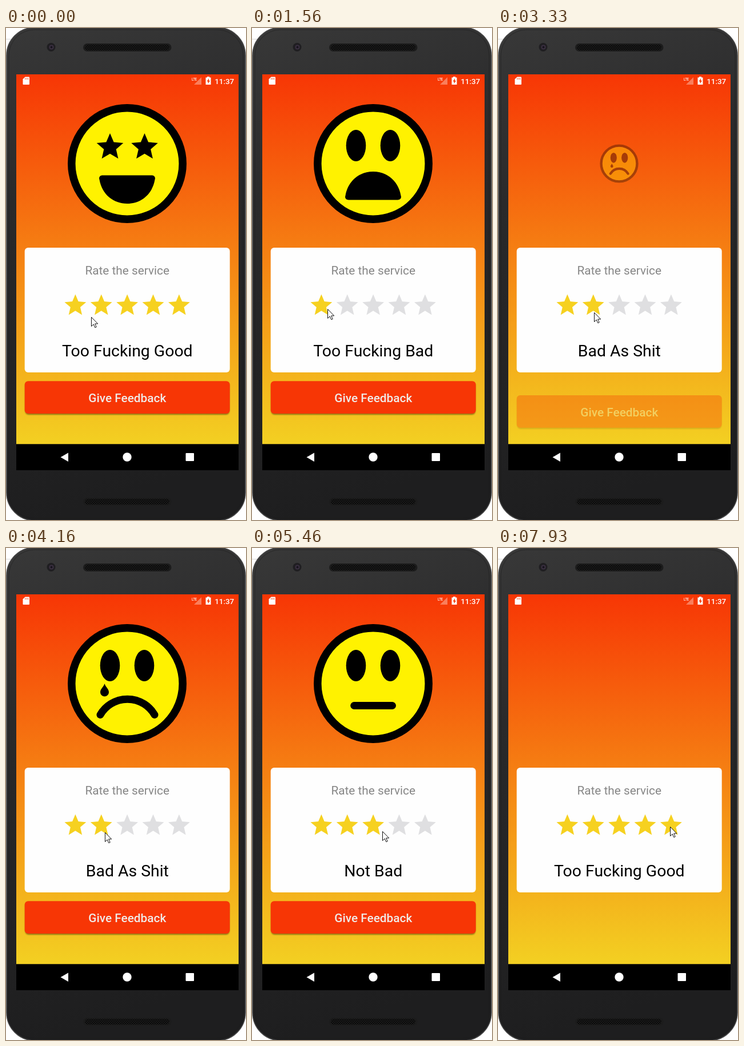
An HTML page that plays this animation: 420x860 px, repeating every 8000 ms.

```html
<!DOCTYPE html>
<html lang="en">
<head>
<meta charset="utf-8">
<title>Rate the service</title>
<style>
html, body { margin: 0; width: 100%; height: 100%; overflow: hidden; background: #fff; }
svg { display: block; }
text { font-family: Roboto, sans-serif; text-anchor: middle; }
.line { fill: none; stroke: #000; stroke-width: 13; stroke-linecap: round; }
</style>
</head>
<body>
<svg width="420" height="860" viewBox="0 0 420 860">
  <defs>
    <linearGradient id="shell" x2=".15" y2="1">
      <stop stop-color="#383838"/><stop offset=".35" stop-color="#2a2a2b"/><stop offset="1" stop-color="#1e1e1f"/>
    </linearGradient>
    <linearGradient id="sky" x2="0" y2="1">
      <stop stop-color="#f73605"/><stop offset="1" stop-color="#f3d022"/>
    </linearGradient>
    <pattern id="mesh" width="4" height="4" patternUnits="userSpaceOnUse">
      <circle cx="1" cy="1" r=".9"/><circle cx="3" cy="3" r=".9"/>
    </pattern>
    <filter id="blur" x="-5%" y="-20%" width="110%" height="150%"><feGaussianBlur stdDeviation="1.3"/></filter>
    <path id="star" d="M12 17.27L18.18 21l-1.64-7.03L22 9.24l-7.19-.61L12 2 9.19 8.63 2 9.24l5.46 4.73L5.82 21z"/>
    <path id="starEye"/>
    <path id="mouth" d="M169 300.5C164.500 300.500 162 297 163.500 293C168 267 188 251 212 251S256 267 260.500 293C262 297 259.500 300.500 255 300.500Z"/>
    <g id="grille">
      <rect x="135" y="27" width="154.500" height="14" rx="7" fill="#1c1c1c"/>
      <rect x="138" y="29" width="148" height="10" rx="5" fill="url(#mesh)"/>
    </g>
  </defs>

  <!-- phone -->
  <path d="M0 19.500H12" stroke="#ddd"/>
  <rect x="1" y="-1" width="418" height="862" rx="49" fill="url(#shell)" stroke="#454545" stroke-width="1.500"/>
  <rect x="5" y="3" width="410" height="854" rx="45" fill="none" stroke="#1b1b1b" stroke-opacity=".5"/>
  <use href="#grille"/>
  <use href="#grille" y="794"/>
  <circle cx="79" cy="33.500" r="7.500" fill="#1f1e21"/>
  <circle cx="79.500" cy="33.500" r="4" fill="#3a2f40"/>
  <circle cx="79.500" cy="33.500" r="2" fill="#17141c"/>

  <!-- screen -->
  <rect x="18" y="81" width="389" height="646.500" fill="url(#sky)"/>
  <rect x="18" y="727.500" width="389" height="45.500"/>
  <g fill="#fff">
    <path d="M109 742.500V758L95.500 750.200Z"/>
    <circle cx="212" cy="750" r="7.700"/>
    <rect x="314.500" y="743" width="14.500" height="14" rx="1"/>
    <path d="M33.500 85.500H40q1 0 1 1V98q0 1-1 1H30.500q-1 0-1-1V89.500Z"/>
    <path d="M33.700 87.500v2.500M36.200 87.500v2.500M38.700 87.500v2.500" stroke="#f73c06"/>
    <path d="M342 86V99H329Z" opacity=".35"/>
    <text x="329.500" y="91.500" font-size="7.500" font-weight="500" textLength="9" lengthAdjust="spacingAndGlyphs">LTE</text>
    <path d="M352 85h4v1.500h2.500V99h-9V86.500H352Z"/>
    <path d="M355 88l-3.500 5.500h2V97.500L357 92h-2Z" fill="#f73c06"/>
    <text x="382.200" y="97.500" font-size="13.400" font-weight="500">11:37</text>
  </g>

  <!-- face -->
  <g id="face">
    <circle cx="212" cy="237" r="97.200" fill="#fff200" stroke="#000" stroke-width="13.500"/>
    <g id="eyes"><ellipse cx="182" cy="205.500" rx="17.300" ry="27.500"/><ellipse cx="242" cy="205.500" rx="17.300" ry="27.500"/></g>
    <g class="mood"><use href="#mouth"/></g>
    <g class="mood">
      <path class="line" d="M165 291.500A55 55 0 0 1 260 291.500"/>
      <path d="M172.500 237C174 243 180 246 180 252A7.500 7.500 0 0 1 165 252C165 246 171 243 172.500 237Z"/>
    </g>
    <g class="mood"><path class="line" d="M178.700 275.500H245.500"/></g>
    <g class="mood"><path class="line" d="M165.500 266A54 54 0 0 0 258.500 266"/></g>
    <g class="mood">
      <use href="#starEye" x="182" y="208.500"/><use href="#starEye" x="242.500" y="208.500"/>
      <use href="#mouth" transform="matrix(1 0 0 -1 0 558)"/>
    </g>
  </g>

  <!-- card -->
  <rect x="32.700" y="384" width="359" height="218" rx="6" fill="#fefefe"/>
  <text x="212.200" y="431" font-size="20.800" fill="#868686">Rate the service</text>
  <g id="stars"></g>
  <text id="label" x="212.300" y="574" font-size="28.400"></text>

  <g id="button">
    <rect x="33.500" y="619" width="357.500" height="57" rx="6" opacity=".4" filter="url(#blur)"/>
    <rect x="32.700" y="617.300" width="359" height="56.700" rx="6" fill="#f73605"/>
    <text x="212.300" y="654" font-size="20.800" font-weight="500" fill="#f0ebe8">Give Feedback</text>
  </g>

  <path id="cursor" d="M.5.500V16.500L4.200 13 6.800 18.700 9.200 17.700 6.700 12H11.700Z" fill="#fff" stroke="#111"/>
</svg>
<script>
const $ = id => document.getElementById(id);
const labels = ["Too Fucking Bad", "Bad As Shit", "Not Bad", "Good", "Too Fucking Good"];
const LOOP = 8000, REVEAL = 600;

// each tap: finger down fills the stars, release swaps the face, then it grows back in
const taps = [
  { down: -1200, up: -1100, show: -1000, rating: 5 },
  { down: 730, up: 860, show: 960, rating: 1 },
  { down: 2860, up: 3000, show: 3100, rating: 2 },
  { down: 4660, up: 4730, show: 4860, rating: 3 },
  { down: 6060, up: 6200, show: 6282, rating: 4 },
  { down: 7830, up: 7930, show: 8030, rating: 5 }
];
// time, x, y of the pointer tip
const path = [
  [0, 149, 505], [500, 132, 491], [2100, 132, 491], [2600, 168, 497],
  [4120, 168, 497], [4460, 209, 496], [5200, 209, 496], [5460, 228, 495],
  [5570, 228, 495], [5860, 255, 489], [7070, 255, 489], [7250, 270, 496], [7530, 301, 487]
];

$("starEye").setAttribute("d", "M" + Array.from({ length: 10 }, (_, i) => {
  const r = i % 2 ? 11.2 : 24.5, a = i * Math.PI / 5;
  return [r * Math.sin(a), -r * Math.cos(a)].map(v => v.toFixed(2));
}).join("L") + "Z");

$("stars").innerHTML = labels.map((_, i) =>
  `<use href="#star" transform="translate(${98.7 + 45.38 * i} 461.7) scale(1.89)"/>`).join("");
const stars = [...$("stars").children];
const moods = [...document.querySelectorAll(".mood")];

function pointer(t) {
  const i = path.findIndex(p => p[0] > t);
  if (i < 0) return path.at(-1).slice(1);
  const [t0, x0, y0] = path[i - 1], [t1, x1, y1] = path[i];
  const k = (t - t0) / (t1 - t0);
  return [x0 + (x1 - x0) * k, y0 + (y1 - y0) * k];
}

function draw(t) {
  const { rating } = taps.findLast(p => p.down <= t);
  const shown = taps.findLast(p => p.up <= t);
  const k = Math.min(1, Math.max(0, (t - shown.show) / REVEAL));
  const s = (1 - Math.cos(k * Math.PI)) / 2;

  stars.forEach((star, i) => star.setAttribute("fill", i < rating ? "#f6d120" : "#dfdfe1"));
  moods.forEach((mood, i) => mood.style.display = i + 1 === shown.rating ? "" : "none");
  $("eyes").style.display = shown.rating < 5 ? "" : "none";
  $("label").textContent = labels[shown.rating - 1];

  $("face").setAttribute("transform", `translate(212 237) scale(${s}) translate(-212 -237)`);
  $("button").setAttribute("transform", `translate(0 ${36.5 * (1 - s)})`);
  $("face").style.opacity = $("button").style.opacity = s;
  $("cursor").setAttribute("transform", `translate(${pointer(t)})`);
}

const start = performance.now();
function tick() {
  draw((performance.now() - start) % LOOP);
  requestAnimationFrame(tick);
}
tick();
</script>
</body>
</html>
```
